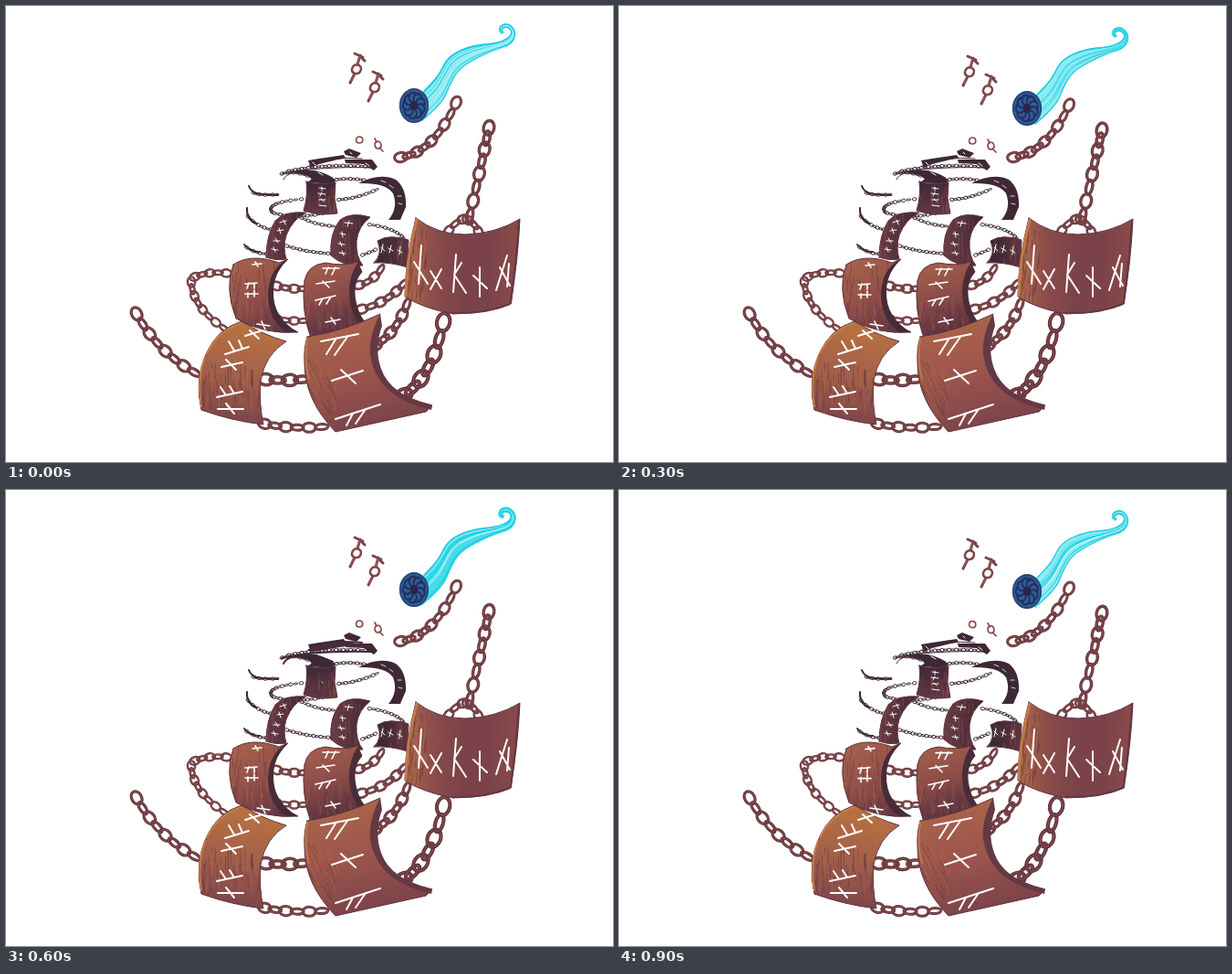
Write an HTML page with a canvas that moves like this. It is 665x499 px and loops after 1000 ms.

```html
<!DOCTYPE html>
<html lang="en">
<head>
<meta charset="utf-8">
<title>Rune ship</title>
<style>
html, body { margin: 0; width: 100%; height: 100%; overflow: hidden; background: #fff; }
canvas { display: block; width: 665px; height: 499px; }
</style>
</head>
<body>
<canvas width="665" height="499"></canvas>
<script>
const ctx = document.querySelector('canvas').getContext('2d');
ctx.lineCap = ctx.lineJoin = 'round';

let seed = 1;
const rnd = () => (seed = seed * 16807 % 2147483647) / 2147483647;

function line(d, color, width = 1) {
  ctx.strokeStyle = color;
  ctx.lineWidth = width;
  ctx.stroke(new Path2D(d));
}

function fill(d, color) {
  ctx.fillStyle = color;
  ctx.fill(new Path2D(d));
}

const runes = (d, width = 2) => line(d, '#fff', width);

// Curved sail: gradient from a to b plus short brush strokes
function sail(d, [x0, y0, x1, y1], colors, [hx, hy, hw, hh], slope = 0, count = 70) {
  const path = new Path2D(d), g = ctx.createLinearGradient(x0, y0, x1, y1);
  colors.forEach((c, i) => g.addColorStop(i / (colors.length - 1), c));
  ctx.fillStyle = g;
  ctx.fill(path);
  ctx.save();
  ctx.clip(path);
  for (let i = 0; i < count; i++) {
    const x = hx + rnd() * hw, y = hy + rnd() * hh, len = 6 + rnd() * 12;
    line(`M${x} ${y}l${slope * len} ${len}`, rnd() < .5 ? '#5b303d70' : '#b56d4c55');
  }
  ctx.restore();
  line(d, '#5d3340', 1);
}

// Links along a quadratic curve
function chain(x0, y0, cx, cy, x1, y1, size, color = '#7c444b') {
  const at = (a, b, c, t) => (1 - t) ** 2 * a + 2 * t * (1 - t) * b + t * t * c;
  const len = (Math.hypot(x1 - x0, y1 - y0) + Math.hypot(cx - x0, cy - y0) + Math.hypot(x1 - cx, y1 - cy)) / 2;
  const n = Math.max(2, Math.round(len / size / .78));
  for (let i = 0; i < n; i++) {
    const t = (i + .5) / n;
    const dx = (1 - t) * (cx - x0) + t * (x1 - cx), dy = (1 - t) * (cy - y0) + t * (y1 - cy);
    ctx.beginPath();
    ctx.ellipse(at(x0, cx, x1, t), at(y0, cy, y1, t), size * .47, size * (i % 2 ? .2 : .34),
      Math.atan2(dy, dx), 0, 7);
    ctx.strokeStyle = size > 9 ? '#62353f' : color;
    ctx.lineWidth = Math.max(1, size * .2);
    ctx.stroke();
    if (size > 9) {
      ctx.strokeStyle = '#96534c';
      ctx.lineWidth = 1;
      ctx.stroke();
    }
  }
}

function rigging(bold) {
  const dark = '#3f2836', w = bold ? 2 : 1;
  [[301, 184, 318, 178, 345, 192], [308, 181, 350, 172, 400, 176], [345, 194, 370, 186, 394, 191],
   [363, 212, 385, 211, 408, 200], [327, 211, 282, 215, 292, 226], [292, 226, 320, 235, 358, 224],
   [322, 231, 340, 240, 360, 241], [396, 239, 425, 242, 437, 255], [306, 262, 330, 270, 359, 271],
   [389, 273, 398, 270, 406, 266], [264, 229, 275, 242, 292, 245], [262, 263, 275, 272, 287, 271],
   [270, 204, 280, 208, 299, 206]].forEach(c => chain(...c, 5, dark));
  line('M266 197Q269 206 281 206L298 207M264 221Q263 233 274 238M261 261Q267 269 278 269', dark, 2);
  line('M302 184Q340 175 404 177M332 175Q358 164 390 167M304 190Q308 179 340 181L358 188', dark, w);
  fill('M331 169L343 167 370 163 372 166 343 173 334 177ZM370 159L376 156 389 161 384 166 372 163ZM371 168L401 168 407 176 403 180 392 173 372 172Z', dark);
  fill('M318 180Q345 177 359 189L361 195 328 193Q345 188 318 183Z', dark);
  if (bold) fill('M334 172L372 165 400 172 372 171 336 177Z', '#4a2c38');
  else runes('M336 171l3 3M377 160l2 2M394 172l4 3M342 182l5 3', 1);
  fill('M386 194Q410 182 427 190Q439 199 438 220L432 234 419 234Q430 221 424 205Q416 193 386 194Z', dark);
  runes('M411 191l5 2M420 196l4 3M429 208l4 0M430 216l4 1', .8);
}

function smallSails(bold) {
  sail('M329 192Q344 197 361 193L360 210 363 227Q344 230 326 224Q331 208 329 192Z',
    [0, 192, 0, 228], ['#40283a', '#633944'], [327, 192, 36, 30], 0, 30);
  runes(bold ? 'M346 210l1 1' : 'M343 199l7 1M346 198l0 4M342 205l8 1M346 204l-2 4M343 212l7 0M345 211l3 3M343 218l8 1', 1);
  sail('M285 275Q285 251 295 235Q305 224 329 226Q314 233 307 251Q303 264 307 277Q296 279 285 275Z',
    [285, 0, 325, 0], ['#6a3c45', '#422835'], [285, 226, 35, 45], 0, 28);
  runes('M300 237l7-2M304 234l2 5M297 246l7-1M299 243l2 6M293 257l7 0M295 254l3 5M291 266l7 1M293 264l2 5', 1);
  sail('M356 273Q354 249 366 234Q378 225 399 231Q386 241 384 257Q383 274 391 284Q370 286 356 273Z',
    [358, 0, 396, 0], ['#6a3c45', '#422835'], [357, 228, 35, 50], 0, 28);
  runes('M371 237l9 1M376 235l-2 6M366 249l6 1M368 247l1 6M364 260l7 1M366 258l2 5M365 270l7 1M368 268l2 5', 1);
  sail('M403 281Q413 272 407 257Q420 249 441 256L440 286Q421 280 403 281Z',
    [405, 0, 440, 0], ['#352532', '#5d3540'], [405, 252, 35, 30], 0, 20);
  runes('M413 261l-2 9M411 264l4 4M422 262l-2 8M419 265l5 3M432 263l-1 9M429 267l5 3', 1);
}

function bigSails(shift) {
  chain(246, 293, 222, 289, 203, 298, 12);
  chain(203, 298, 202, 330, 244, 356, 12);
  chain(292, 305, 310, 311, 331, 309, 13);
  chain(292, 341, 310, 346, 331, 344, 12);
  chain(382, 306, 402, 304, 413, 284, 13);
  chain(384, 333, 419, 326, 438, 301, 14);
  chain(400, 374, 429, 359, 441, 321, 16);

  sail('M249 283Q268 270 299 281L309 277Q293 290 292 313Q291 345 320 357Q283 360 252 342Q239 309 249 283Z',
    [250, 278, 300, 354], ['#a8644a', '#92504a', '#633742'], [246, 276, 55, 78], 0, 70);
  fill('M309 277Q287 287 287 318Q289 345 307 357L320 357Q292 341 293 312Q292 294 309 277Z', '#462b38');
  sail('M327 301Q330 283 350 281Q370 285 385 280L390 291Q377 302 382 326Q385 342 397 351L334 364Q323 332 327 301Z',
    [340, 282, 365, 358], ['#a45e4a', '#8a4b49', '#573140'], [326, 320, 66, 40], 0, 70);
  fill('M385 281L390 291Q378 306 385 329Q390 346 400 349L390 351Q376 337 376 312Q376 296 385 281Z', '#4a2d39');
  ctx.save();
  ctx.translate(0, shift);
  runes('M270 283l10-1M273 280l3 5M262 304l13-1M266 303l-2 6M272 303l0 6M262 315l14 0M265 314l0 5M272 311l0 7', 1.6);
  runes('M347 287l18 0M353 286l-3 7M361 286l-4 8M340 304l20-3M347 301l7 7M339 322l22-5M347 320l-4 7M356 318l-5 8', 1.6);
  ctx.restore();
  runes('M275 348l14 2M280 345l4 9M350 346l16-3M356 341l5 7', 1.5);

  chain(140, 331, 164, 379, 212, 404, 16);
  chain(278, 408, 304, 411, 331, 408, 18);
  chain(278, 456, 310, 464, 353, 460, 15);
  chain(430, 430, 469, 408, 481, 336, 21);

  sail('M258 345Q282 360 307 367Q284 381 279 410Q277 435 282 458Q247 454 214 442Q206 409 220 379Q232 353 258 345Z',
    [258, 346, 239, 456], ['#b9733f', '#a3604a', '#7b4349'], [209, 390, 75, 45], 0, 120);
  line('M220 380Q232 356 257 347M214 438Q209 408 218 384', '#c37d4b', 2);
  runes('M262 361L281 355M267 355L277 364M240 381L266 373M250 377L244 367M259 375L255 366M236 395L259 390M241 387L252 398M231 428L259 422M241 426L235 417M250 424L245 416M232 441L260 441M241 435L250 446');

  sail('M330 362Q370 356 410 337Q398 363 402 388Q410 423 467 437L460 444 361 466Q327 431 327 391Q326 375 330 362Z',
    [360, 352, 387, 464], ['#a9634a', '#9b544c', '#7b4349'], [328, 385, 30, 60], .5, 70);
  fill('M410 337Q397 361 399 382Q405 423 452 438L466 442 467 437Q421 426 411 397Q403 375 412 350Z', '#653944');
  line('M330 364Q326 389 332 408', '#bd784b', 2);
  runes('M345 367L386 359M361 365L351 381M374 362L360 382M357 410L391 399M367 398L383 413M361 452L410 436M380 446L373 459M394 441L383 457');
}

function rightSail(bob) {
  chain(530, 128 + bob, 522, 170, 506, 238, 17);
  chain(505, 232, 491, 235, 482, 251, 13);
  chain(502, 233, 515, 236, 519, 252, 13);
  sail('M449 232Q472 250 503 250Q537 249 563 233Q561 278 553 326Q532 336 490 337Q457 331 437 318Q438 274 449 232Z',
    [438, 0, 560, 0], ['#ad6849', '#8b4c4a', '#7b4349', '#7b4349', '#8a4a4a'], [437, 240, 24, 80], -.1, 90);
  line('M450 234Q438 278 438 317', '#bf7b4b', 3);
  line('M552 326Q526 337 489 336M562 235Q559 280 553 325', '#653842', 2);
  runes('M455 262L452 304M447 280L462 304M477 288L465 310M465 290L477 309M493 272L490 313M499 281L491 294L504 314M519 286L519 318M512 295L527 309M549 273L537 311M541 286L552 306M551 282L549 307');
}

function fragments(bob) {
  ctx.save();
  ctx.translate(0, bob);
  [[384, 69], [404, 89]].forEach(([x, y]) => {
    ctx.save();
    ctx.translate(x, y);
    line('M-2-17l9 4M4-15L1-5M-2 5l-5 10M6-12l3 3', '#7a434b', 3);
    line('M1-5c7 2 4 11-3 10c-6-3-2-10 3-10z', '#804649', 2.5);
    line('M4-14L1-6M-3 7l-3 6', '#aa6351');
    ctx.restore();
  });
  ctx.restore();
  const dy = bob / 3;
  line(`M387 ${143 + dy}c5 0 5 7 0 7c-5 0-4-7 0-7M407 ${148 + dy}c4 0 6 7 1 8c-5 0-5-7-1-8m-3-3l2 4m3 6l4 4`, '#8a4d4c', 1.7);
  chain(428, 166, 470, 163, 496, 99 + bob, 15);
}

// Flame spine: x, y and half-width vector
const spine = [[457, 109, 1, -16], [472, 96, -6, -11], [481, 79, -6, -5], [491, 61, -6, -7], [513, 50, -2, -7],
  [537, 44, 0, -3], [552, 39, -2, -3], [557, 29, -2, 0], [551, 21, 0, 2], [543, 22, 1, 1], [541, 28, 1, 0], [547, 30, 0, -1]];

function strand(u, color, width) {
  const p = spine.map(([x, y, a, b]) => [x + a * u, y + b * u]);
  let d = `M${p[0]}`;
  for (let i = 1; i < p.length - 1; i++)
    d += `Q${p[i]} ${(p[i][0] + p[i + 1][0]) / 2} ${(p[i][1] + p[i + 1][1]) / 2}`;
  line(d, color, width);
}

function comet(pose, bob, orbBob) {
  const full = pose > 3;
  ctx.save();
  ctx.translate(0, bob);
  for (let u = -.9; u < 1; u += .2) strand(u, full ? '#48dce9' : '#8beaf2', full ? 3.2 : 2.4);
  seed = 50 + pose;
  for (let i = 0; i < 13; i++) strand(rnd() * 2 - 1, i % 3 ? '#1bd1e3' : '#c5f6f8', .9);
  strand(1, '#20cce2', 1.3);
  strand(-1, '#20cce2', 1.3);
  ctx.restore();

  ctx.save();
  ctx.translate(447, 109 + orbBob);
  ctx.scale(.85, 1);
  ctx.beginPath();
  ctx.arc(0, 0, 18, 0, 7);
  ctx.fillStyle = '#2d609b';
  ctx.fill();
  ctx.strokeStyle = '#244578';
  ctx.lineWidth = 2;
  ctx.stroke();
  for (let i = 0; i < 9; i++) {
    ctx.rotate(Math.PI * 2 / 9);
    line('M3 0Q11-5 14 3Q13 8 9 9', '#24315f', 2.4);
  }
  ctx.beginPath();
  ctx.arc(0, 0, 5, 0, 7);
  ctx.fillStyle = '#2b234b';
  ctx.fill();
  ctx.restore();
}

const flameBob = [0, 3, 3.5, 4, 0, -1], orbBobs = [0, 2, 2.5, 3, 0, -1], chainBob = [0, 2, 2.5, 3, 0, 0];

function draw(now) {
  const step = Math.floor(now / 100) % 10, pose = Math.min(step, 10 - step);
  const bold = pose > 3, bob = chainBob[pose];
  ctx.clearRect(0, 0, 665, 499);
  seed = 7;
  rigging(bold);
  smallSails(bold);
  bigSails(bob / 3);
  rightSail(bob);
  fragments(bob);
  comet(pose, flameBob[pose], orbBobs[pose]);
}

const start = performance.now();
function tick() {
  draw(performance.now() - start);
  requestAnimationFrame(tick);
}
tick();
</script>
</body>
</html>
```
